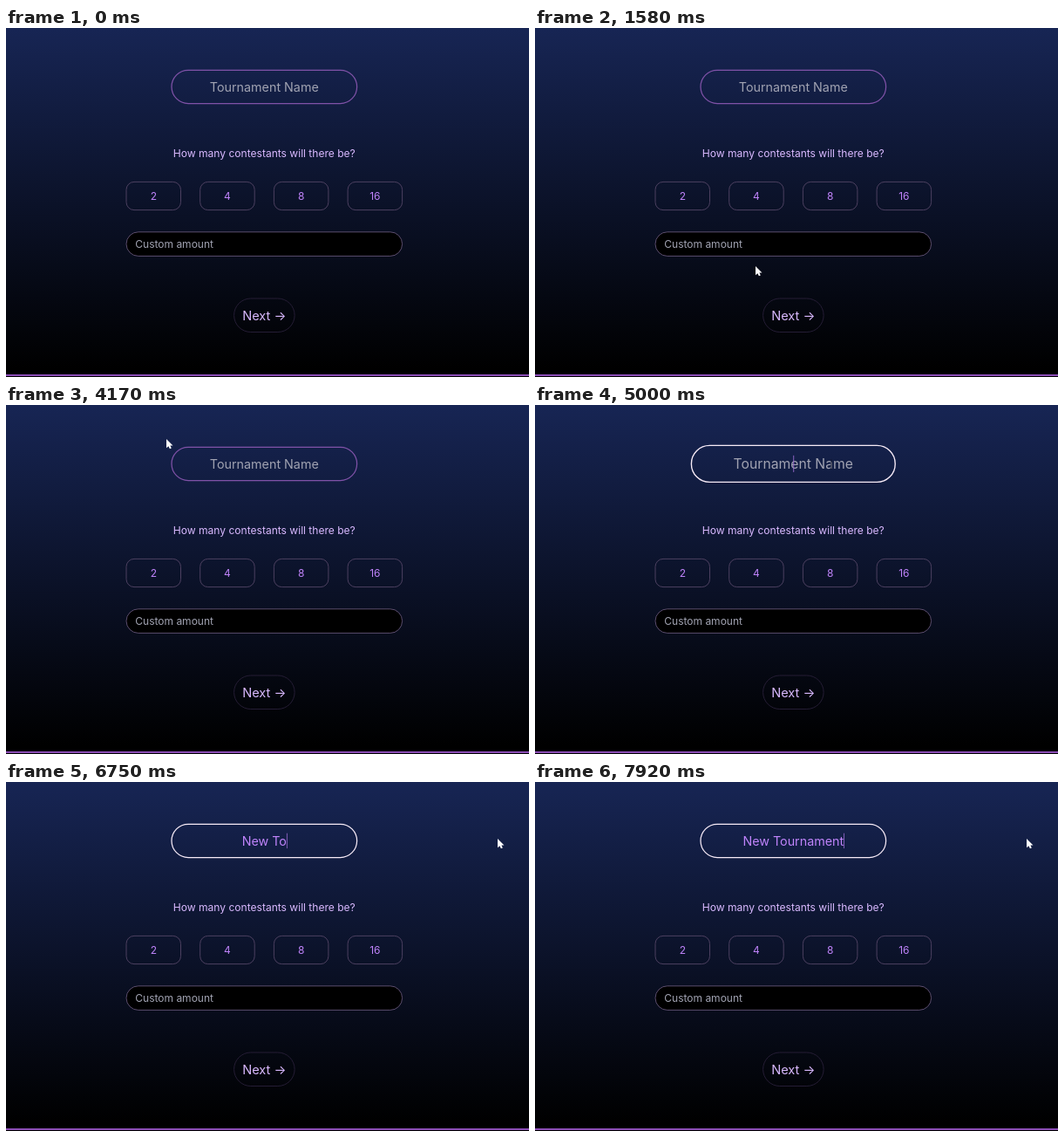
Write an HTML page with a canvas that moves like this. It is 600 px wide and 400 px high and loops after 8 s.

```html
<!DOCTYPE html>
<html lang="en">
<head>
<meta charset="utf-8">
<title>Tournament setup</title>
<style>
  html, body { margin: 0; width: 100%; height: 100%; overflow: hidden; background: #000; }
  canvas { display: block; width: 600px; height: 400px; }
</style>
</head>
<body>
<canvas id="stage" width="600" height="400"></canvas>
<script>
const ctx = document.getElementById('stage').getContext('2d');
const LOOP = 8000, STEP = 1000 / 12;
const CENTER = 296.3;
const PURPLE = '#c084fc', LILAC = '#d9b9ff', GRAY = '#a1a3b2';
const TITLE = 'New Tournament';
const HOVER_IN = 4250, FOCUS = 4830, HOVER_OUT = 5083;
const TYPING_START = 5880, KEY_INTERVAL = 156;

const clamp = v => Math.max(0, Math.min(1, v));
const smooth = v => v * v * (3 - 2 * v);
const progress = (t, start, duration) => clamp((t - start) / duration);

const pointerStart = { x: 361, y: 388 };
const pointerMoves = [
  { start: 1333, duration: 250, x: 253, y: 273 },
  { start: 1833, duration: 250, x: 85, y: 378 },
  { start: 2167, duration: 83, x: 69, y: 343 },
  { start: 3000, duration: 1, x: 74, y: 2 },
  { start: 3500, duration: 667, x: 184, y: 39 },
  { start: 4167, duration: 500, x: 340, y: 68 },
  { start: 5000, duration: 417, x: 564, y: 65 }
];
const pointerVisible = t => (t > 1330 && t < 2330) || t > 3490;

function pointerAt(t) {
  return pointerMoves.reduce((at, move) => {
    const k = smooth(progress(t, move.start, move.duration));
    return { x: at.x + (move.x - at.x) * k, y: at.y + (move.y - at.y) * k };
  }, pointerStart);
}

function box(x, y, w, h, r, stroke, lineWidth = 1, fill = 'transparent') {
  ctx.beginPath();
  ctx.roundRect(x, y, w, h, r);
  ctx.fillStyle = fill;
  ctx.fill();
  ctx.strokeStyle = stroke;
  ctx.lineWidth = lineWidth;
  ctx.stroke();
}

function text(str, x, y, size, color, align = 'center') {
  ctx.font = `${size}px Inter, sans-serif`;
  ctx.textAlign = align;
  ctx.fillStyle = color;
  ctx.fillText(str, x, y);
  return ctx.measureText(str).width;
}

function drawPage() {
  const sky = ctx.createLinearGradient(0, 0, 0, 390);
  sky.addColorStop(0, '#172554');
  sky.addColorStop(1, '#000');
  ctx.fillStyle = sky;
  ctx.fillRect(0, 0, 600, 400);
  ctx.fillStyle = '#8a4cb4';
  ctx.fillRect(0, 396.9, 600, 2.1);

  text('How many contestants will there be?', CENTER, 147.8, 12.05, LILAC);
  for (let i = 0; i < 4; i++) {
    const x = 138 + i * 84.7;
    box(x, 176.4, 62.5, 32.2, 9, '#4c4060');
    text(2 ** (i + 1), x + 31.3, 197, 12, PURPLE);
  }
  box(138, 233.8, 316.6, 27.6, 13.8, '#5b4d6e', 1, '#000');
  text('Custom amount', 148.3, 252, 12, GRAY, 'left');
  box(261.6, 310, 69.5, 38.5, 19.2, '#251d35');
  text('Next →', CENTER, 334.8, 14.6, LILAC);
}

function drawNameField(t) {
  const hover = smooth(progress(t, HOVER_IN, 160)) - smooth(progress(t, HOVER_OUT, 160));
  const focused = t >= FOCUS;
  const typed = TITLE.slice(0, Math.max(0, Math.floor(1 + (t - TYPING_START) / KEY_INTERVAL)));
  const zoom = 1 + 0.1 * hover;

  ctx.save();
  ctx.translate(CENTER, 67.4);
  ctx.scale(zoom, zoom);
  box(-106.3, -19.1, 212.6, 38.2, 19.1, focused ? '#f7ebf7' : '#8052a8', 1.25);
  const width = text(typed || 'Tournament Name', 0, 5.4, 14.3, typed ? PURPLE : GRAY);
  if (focused && (typed || (t - FOCUS) % 1000 < 500)) {
    ctx.fillStyle = '#9a6cd0';
    ctx.fillRect(typed ? width / 2 : 0, -8.7, 0.8, 17.4);
  }
  ctx.restore();
}

function drawPointer(t) {
  if (!pointerVisible(t)) return;
  const { x, y } = pointerAt(t);
  ctx.save();
  ctx.translate(x, y);
  if (t >= HOVER_IN && t < HOVER_OUT) {
    ctx.fillStyle = '#11172f';
    ctx.fillRect(-0.5, -6, 1, 12);
  } else {
    ctx.fillStyle = '#fff';
    ctx.fill(new Path2D('M0 0V10.2L2.4 8.2L3.9 11.3L5.8 10.4L4.4 7.5H7.5Z'));
  }
  ctx.restore();
}

function frame() {
  // The picture advances in twelfths of a second, like a screen recording.
  const t = Math.floor((performance.now() % LOOP + 6) / STEP) * STEP;
  drawPage();
  drawNameField(t);
  drawPointer(t);
  requestAnimationFrame(frame);
}
frame();
</script>
</body>
</html>
```
